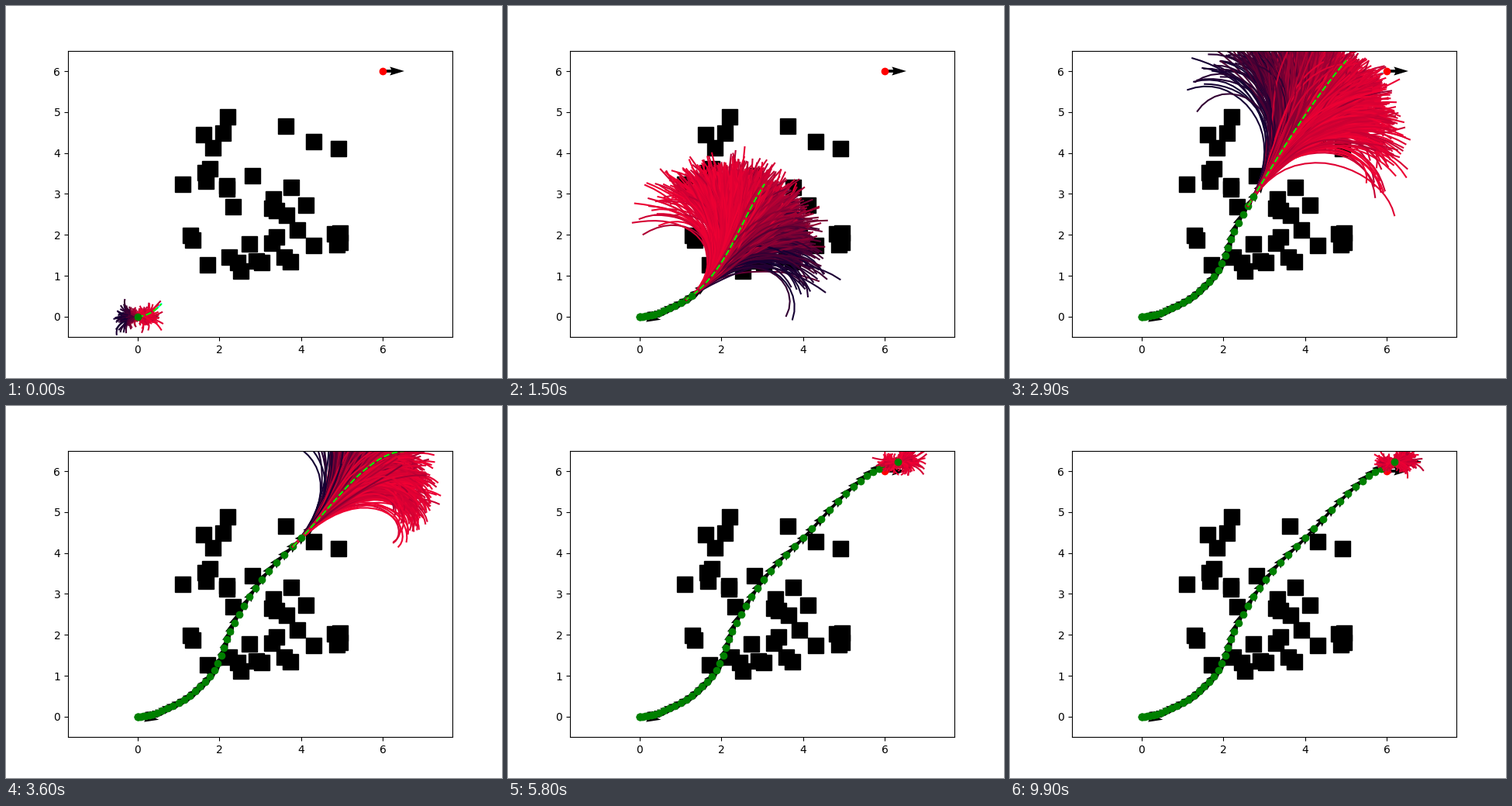
Recreate the animation shown at these times as a matplotlib script. Size 640 by 480 pixels, loop 10 s.

```python
import numpy as np
import matplotlib.pyplot as plt
from matplotlib.animation import FuncAnimation
from matplotlib.collections import LineCollection

FRAMES = 100
UNIT = 52.8        # pixels per data unit
SAMPLES = 1000
STEPS = 20
ARRIVED = 49       # step at which the robot reaches the goal

obstacles = np.array([
    (2.21, 4.89), (1.61, 4.44), (2.10, 4.48), (1.85, 4.12), (3.62, 4.66),
    (4.30, 4.27), (4.92, 4.10), (1.76, 3.62), (1.65, 3.51), (1.68, 3.32),
    (1.10, 3.23), (2.82, 3.44), (2.19, 3.19), (2.18, 3.12), (2.33, 2.68),
    (3.75, 3.15), (4.11, 2.72), (3.33, 2.88), (3.29, 2.64), (3.39, 2.60),
    (3.65, 2.48), (3.90, 2.12), (3.39, 1.94), (3.29, 1.79), (2.73, 1.77),
    (4.30, 1.73), (4.82, 2.03), (4.96, 2.05), (4.87, 1.75), (4.96, 1.81),
    (1.30, 1.98), (1.36, 1.88), (1.72, 1.27), (2.25, 1.46), (2.46, 1.33),
    (2.52, 1.11), (2.90, 1.36), (3.03, 1.32), (3.58, 1.45), (3.73, 1.34)])

# key points of the driven path: step, x, y in pixels from the origin
way = np.array([
    (0, 0, 0), (3, 2, 0), (9, 25, 5), (15, 67.5, 27), (20, 99, 60),
    (26, 125, 121), (32, 169.5, 188), (36, 211.5, 230.5), (40, 256.5, 278),
    (44, 293.5, 311), (ARRIVED, 330.5, 328.8)])

# the plan at a few steps: length in pixels, middle and end heading,
# and the side with the costly rollouts (1 left, -1 right)
plan_steps = [0, 8, 15, 23, 36, 46]
plan_length = [36, 280, 182, 255, 193, 4]
plan_mid = [20, 40, 61, 68, 43, 10]
plan_end = [50, 56, 57, 92, 0, 0]
costly_side = [1, .2, -1, 1, 1, 0]


def hermite(t, knots, vals):
    i = np.clip(np.searchsorted(knots, t, side="right") - 1, 0, len(knots) - 2)
    h = knots[i + 1] - knots[i]
    u = (t - knots[i]) / h
    m = np.gradient(vals, knots)
    return ((1 + 2 * u) * (1 - u) ** 2 * vals[i] + u * (1 - u) ** 2 * h * m[i]
            + u * u * (3 - 2 * u) * vals[i + 1] + u * u * (u - 1) * h * m[i + 1])


def drive():
    """Position, heading in degrees and speed in pixels at every step."""
    n = np.arange(FRAMES)
    x, y = (hermite(np.minimum(n, ARRIVED), way[:, 0], way[:, c]) for c in (1, 2))
    dx, dy = np.gradient(x), np.gradient(y)
    heading = np.degrees(np.arctan2(dy, dx))
    heading[0] = 0
    heading[ARRIVED:] = 0
    speed = np.hypot(dx, dy)
    rest = n[ARRIVED:]
    x[ARRIVED:] = 329.4 + 4 * np.cos(2 * np.pi * (rest - 58) / 11.33)
    return np.column_stack([x, y]) / UNIT, heading, speed


def trace(start, heading, step):
    """Paths from a start point; heading in degrees, step in pixels."""
    a = np.radians(heading)
    moves = np.stack([step * np.cos(a), step * np.sin(a)], axis=-1)
    path = np.cumsum(moves, axis=-2) / UNIT
    origin = np.zeros(path.shape[:-2] + (1, 2))
    return start + np.concatenate([origin, path], axis=-2)


def noise(rng, spread):
    """Summed noise whose second sum ends with the given spread."""
    steps = rng.standard_normal((SAMPLES, STEPS))
    return np.cumsum(steps, axis=1) * spread / np.sqrt(STEPS ** 3 / 3)


t = (np.arange(STEPS) + .5) / STEPS
poses, headings, speeds = drive()

fig, ax = plt.subplots(figsize=(6.4, 4.8), dpi=100)
ax.set_xlim(3 - 248 / UNIT, 3 + 248 / UNIT)
ax.set_ylim(-.5, 6.5)

arrow = dict(scale=18, width=.0075, units="width", color="k")
aim = np.radians(headings)
ax.plot(*obstacles.T, "ks", ms=15)
ax.plot(6, 6, "ro")
ax.quiver([6], [6], [1], [0], **arrow)
arrows = ax.quiver(*poses.T, np.cos(aim), np.sin(aim), **arrow)
trail, = ax.plot([], [], "go")
best, = ax.plot([], [], color="cyan")
rollouts = LineCollection([], linewidths=1.5, capstyle="projecting")
ax.add_collection(rollouts, autolim=False)
plan, = ax.plot([], [], "--", color="lime")
robot, = ax.plot([], [], "go")


def draw(n):
    rng = np.random.default_rng(n)
    last = max(n - 1, 0)
    start = poses[last]
    length, mid, end, side = (
        np.interp(n, plan_steps, key)
        for key in (plan_length, plan_mid, plan_end, costly_side))

    # the plan starts with the robot's own heading and speed
    course = (headings[last] * (1 - t) * (1 - 2 * t) + 4 * mid * t * (1 - t)
              + end * t * (2 * t - 1))
    mean = length / STEPS
    first = speeds[last] if last < ARRIVED else 0
    pace = first + 2 * (mean - first) * t

    turn = np.cumsum(noise(rng, 50), axis=1)
    moving = length > 40 or n > 40
    paths = trace(start, course * moving + turn,
                  pace * moving + noise(rng, 11))

    # costly rollouts are darker
    if length > 40:
        left = turn[:, -1] / 50
    else:
        left = (start - paths[:, -1])[:, 0] * UNIT / 8
    cost = np.clip(.1 + .4 * side * left, 0, 1) * abs(side)
    red = .95 - .75 * cost - .1 * abs(rng.standard_normal(SAMPLES))
    red = np.clip(red, .08, .95)
    rollouts.set_segments(paths)
    rollouts.set_color(np.column_stack([red, 0 * red, 0 * red + .2]))

    stray = np.sin(np.pi * min(n / 46, 1)) ** 4
    best.set_data(*trace(start, course - 22 * stray * np.minimum(1, 2 * t),
                         pace * (1 + .12 * stray)).T)
    plan.set_data(*trace(start, course, pace).T)
    trail.set_data(*poses[:n].T)
    robot.set_data(*poses[n:n + 1].T)
    shown = np.arange(FRAMES)[:, None] <= n
    arrows.set_offsets(np.where(shown, poses, -99))


anim = FuncAnimation(fig, draw, frames=FRAMES, interval=100, repeat=True)
plt.show()
```
